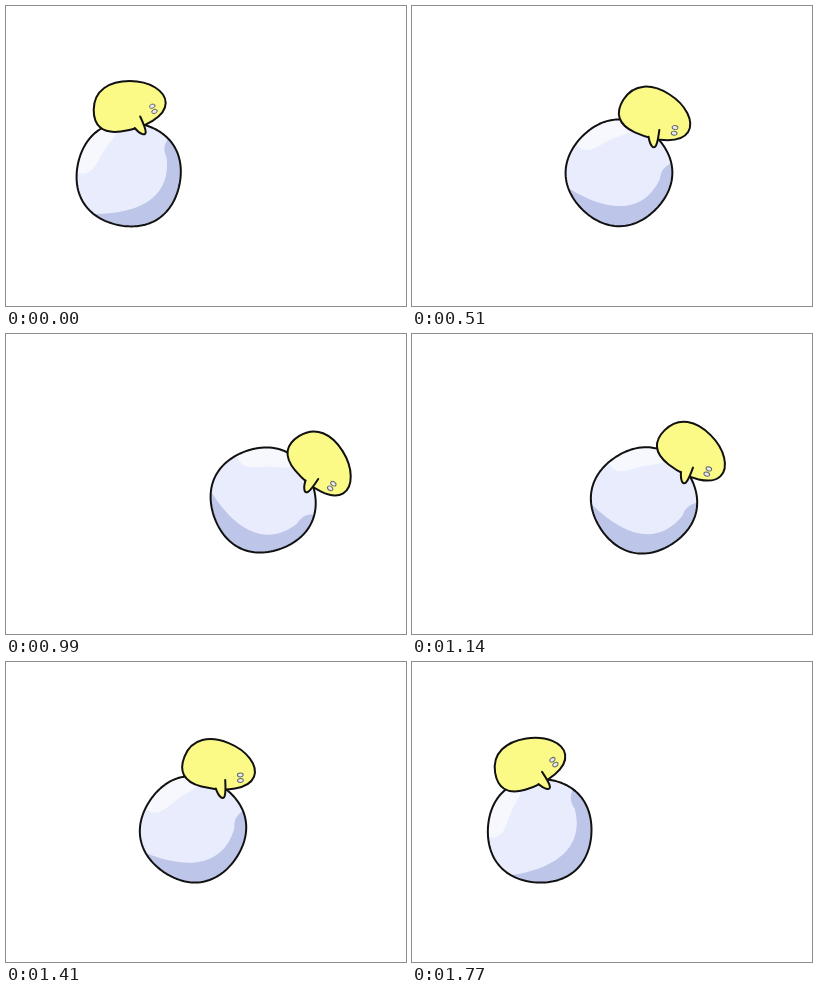
Write an HTML page with a canvas that moves like this. It is 400 px wide and 300 px high and loops after 1800 ms.

```html
<!DOCTYPE html>
<html>
<head>
<meta charset="utf-8">
<style>
html, body { margin: 0; width: 100%; height: 100%; overflow: hidden; background: #fff; }
canvas { display: block; }
</style>
</head>
<body>
<canvas id="stage" width="400" height="300"></canvas>
<script>
const ctx = document.getElementById('stage').getContext('2d');
const LOOP = 1800, STEP = 30, HALF = LOOP / 2, RAD = Math.PI / 180;
const INK = '#111', YELLOW = '#fbfa87';

// All shapes are drawn around the pivot, which sits just right of the ball's centre.
const PIVOT = { x: 125.7, y: 168.3 };
const BALL_X = 123;

// A circle with four faint corners.
function makeBall() {
  const path = new Path2D();
  for (let deg = 0; deg < 360; deg += 3) {
    const r = 52.6 + 0.8 * Math.cos(4 * (deg - 57) * RAD);
    path.lineTo(BALL_X + r * Math.cos(deg * RAD), PIVOT.y + r * Math.sin(deg * RAD));
  }
  path.closePath();
  return path;
}

const ball = makeBall();
const shade = new Path2D('M168 124C156 140 158 144 161 152C165 190 136 208 88 208L100 240H200V120Z');
const shine = new Path2D('M78 168C92 165 92 150 104 137Q112 128 116 112H60V165Z');
const body = new Path2D('M88 104C88 84 104 75 124 75S160 85 160 97C160 110 140 122 115 125.5C96 128 88 119 88 104Z');
const arm = new Path2D('M134.5 110.5C138 118 140 124 140 126C140 130 135 129 129 122');

function fill(path, color) {
  ctx.fillStyle = color;
  ctx.fill(path);
}

function outlined(path, color) {
  fill(path, color);
  ctx.stroke(path);
}

function eye(x, y) {
  const path = new Path2D();
  path.ellipse(x, y, 2.9, 2, -0.4, 0, 2 * Math.PI);
  outlined(path, '#e8eaf4');
}

function draw(t) {
  const reach = 1 - Math.abs(t - HALF) / HALF;
  // Eases into the roll out, then rolls back steadily past upright.
  const angle = t < HALF ? 65 * reach ** 1.25 : -11.5 + 77 * reach;

  ctx.fillStyle = '#fff';
  ctx.fillRect(0, 0, 400, 300);
  ctx.save();
  ctx.translate(125.4 + 148 * reach, PIVOT.y);
  ctx.rotate(angle * RAD);
  ctx.translate(-PIVOT.x, -PIVOT.y);
  ctx.lineJoin = ctx.lineCap = 'round';
  ctx.lineWidth = 2;
  ctx.strokeStyle = INK;

  ctx.save();
  ctx.clip(ball);
  fill(ball, '#e9ecfc');
  fill(shine, '#f6f8fe');
  fill(shade, '#bdc6e8');
  ctx.restore();
  ctx.stroke(ball);

  outlined(body, YELLOW);
  outlined(arm, YELLOW);

  ctx.lineWidth = 1;
  ctx.strokeStyle = '#666';
  eye(146.6, 100.2);
  eye(148.8, 105.4);
  ctx.restore();
}

const start = performance.now();
function frame() {
  const t = (performance.now() - start) % LOOP;
  draw(Math.floor(t / STEP) * STEP);
  requestAnimationFrame(frame);
}
frame();
</script>
</body>
</html>
```
